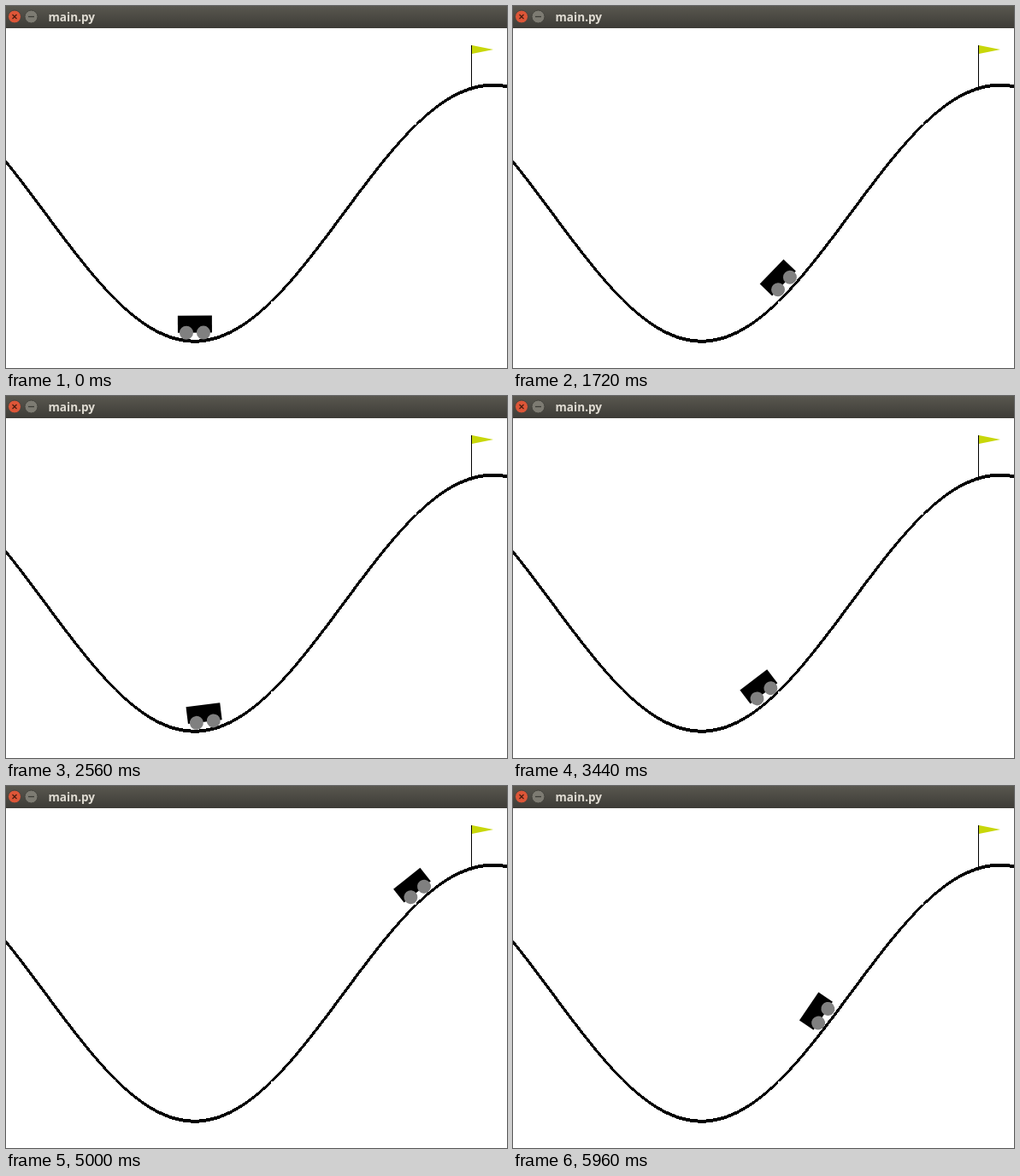
An HTML page with a canvas that plays this animation: 586x424 px, repeating every 6000 ms.

```html
<!DOCTYPE html>
<html lang="en">
<head>
<meta charset="utf-8">
<title>main.py</title>
<style>
html, body { margin: 0; width: 100%; height: 100%; overflow: hidden; background: #fff; }
canvas { display: block; }
</style>
</head>
<body>
<canvas id="stage" width="586" height="424"></canvas>
<script>
const ctx = document.getElementById('stage').getContext('2d');
const W = 586, H = 424, STEP = 40, LOOP = 6000;
const SCALE = 1000 / 3, LEFT = -5, FLOOR = 426;
const POWER = 0.0015, GRAVITY = 0.0025, RATE = 2.14, DT = 0.1;

// Track: height 0.45 sin(3x) + 0.55 over x in [-1.2, 0.6]
const toX = x => (x + 1.2) * SCALE + LEFT;
const toWorld = px => (px - LEFT) / SCALE - 1.2;
const roadY = px => FLOOR - (Math.sin(3 * toWorld(px)) * 0.45 + 0.55) * SCALE;

// The car swings between turning points [step, x]; the runs that reach the
// flag then climb at full power from `low`, passing the point `pass`.
const runs = [
  { turns: [[0, 221], [15.4, 283]], low: 156, pass: [43, 323.7] },
  { turns: [[56, 257], [72, 211], [87, 300.5]], low: 165, pass: [125, 487.2] },
  { turns: [[132, 203.5], [149, 371]] }
];

function fullPower(px) {
  const path = [];
  let x = toWorld(px), v = 0;
  while (x < 0.5 && path.length < 1000) {
    path.push(toX(x));
    v += (POWER - GRAVITY * Math.cos(3 * x)) * DT;
    x += v * DT;
  }
  return path;
}

for (const run of runs.filter(r => r.pass)) {
  run.climb = fullPower(run.low);
  const reached = run.climb.findIndex(x => x >= run.pass[1]);
  run.turns.push([run.pass[0] - reached * DT / RATE, run.low]);
}

function carX(step) {
  const { turns, climb } = runs.filter(r => r.turns[0][0] <= step).pop();
  const next = turns.findIndex(t => t[0] >= step);
  if (next === 0) return turns[0][1];
  if (next < 0) {
    const i = Math.round((step - turns[turns.length - 1][0]) * RATE / DT);
    return climb[Math.min(i, climb.length - 1)];
  }
  const [t0, x0] = turns[next - 1], [t1, x1] = turns[next];
  const ease = (1 - Math.cos(Math.PI * (step - t0) / (t1 - t0))) / 2;
  return x0 + (x1 - x0) * ease;
}

function disc(x, y, r, fill, edge) {
  ctx.beginPath();
  ctx.arc(x, y, r, 0, 2 * Math.PI);
  ctx.fillStyle = fill;
  ctx.fill();
  if (edge) {
    ctx.strokeStyle = edge;
    ctx.lineWidth = 1;
    ctx.stroke();
  }
}

function line(x0, y0, x1, y1, width, color) {
  ctx.beginPath();
  ctx.moveTo(x0, y0);
  ctx.lineTo(x1, y1);
  ctx.lineWidth = width;
  ctx.strokeStyle = color;
  ctx.stroke();
}

function drawTitleBar() {
  const shade = ctx.createLinearGradient(0, 0, 0, 26);
  shade.addColorStop(0, '#59574f');
  shade.addColorStop(1, '#3d3c37');
  ctx.fillStyle = shade;
  ctx.fillRect(0, 0, W, 26);
  disc(10, 12.5, 7.5, '#dd5638', '#45443e');
  line(7.5, 10, 12.5, 15, 1.3, '#4a1d10');
  line(12.5, 10, 7.5, 15, 1.3, '#4a1d10');
  disc(29.5, 12.5, 7.5, '#7d7b72', '#45443e');
  line(26, 12.5, 33, 12.5, 1.3, '#3d3c37');
  ctx.fillStyle = '#dfdbd2';
  ctx.font = 'bold 13.6px "Noto Sans", "Open Sans", sans-serif';
  ctx.fillText('main.py', 49.5, 17.5);
}

// Hard-edged line, four pixels wide across its minor axis
function drawTrack() {
  ctx.fillStyle = '#000';
  const n = 99, at = i => toX(-1.2 + 1.8 * i / n);
  for (let i = 0; i < n; i++) {
    const x0 = at(i), x1 = at(i + 1), y0 = roadY(x0), y1 = roadY(x1);
    const slope = (y1 - y0) / (x1 - x0);
    if (Math.abs(slope) <= 1) {
      for (let x = Math.round(x0); x < Math.round(x1); x++)
        ctx.fillRect(x, Math.floor(y0 + (x + 0.5 - x0) * slope - 1.5), 1, 4);
    } else {
      const end = Math.round(Math.max(y0, y1));
      for (let y = Math.round(Math.min(y0, y1)); y < end; y++)
        ctx.fillRect(Math.floor(x0 + (y + 0.5 - y0) / slope - 1.5), y, 4, 1);
    }
  }
}

function drawFlag() {
  const x = 544, base = Math.round(roadY(545)), top = base - 50;
  ctx.fillStyle = '#000';
  ctx.fillRect(x, top, 1, 50);
  ctx.beginPath();
  ctx.moveTo(x + 1, top);
  ctx.lineTo(x + 1, top + 10);
  ctx.lineTo(x + 26, top + 5);
  ctx.fillStyle = '#c8d70a';
  ctx.fill();
}

function drawCar(x) {
  ctx.save();
  ctx.translate(x, roadY(x));
  ctx.rotate(-Math.cos(3 * toWorld(x)));
  ctx.fillStyle = '#000';
  ctx.fillRect(-20, -30, 40, 20);
  disc(-10, -10, 8, '#808080');
  disc(10, -10, 8, '#808080');
  ctx.restore();
}

function draw() {
  const step = Math.floor(performance.now() % LOOP / STEP);
  ctx.fillStyle = '#fff';
  ctx.fillRect(0, 0, W, H);
  drawTrack();
  drawCar(carX(step));
  drawFlag();
  drawTitleBar();
  requestAnimationFrame(draw);
}
draw();
</script>
</body>
</html>
```
